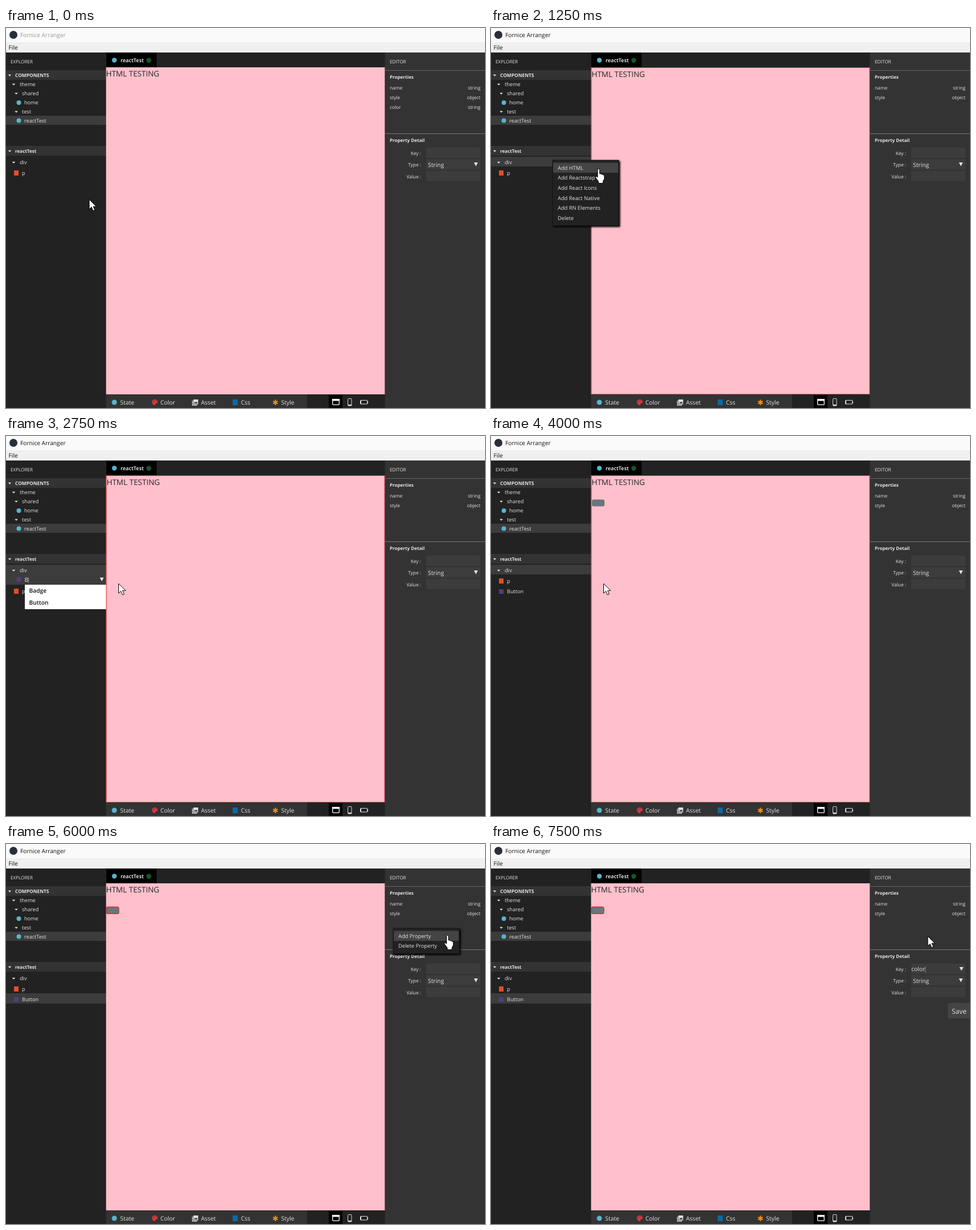
An HTML page for the animation above (8000 ms loop, 840 by 667 pixels).

```html
<!DOCTYPE html>
<html lang="en">
<head>
<meta charset="utf-8">
<style>
  html, body { margin: 0; height: 100%; overflow: hidden; background: #222; }
  svg { display: block; width: 100vw; height: 100vh; font-family: "Open Sans", sans-serif; text-rendering: geometricPrecision; }
  text { white-space: pre; }
</style>
</head>
<body>
<svg id="stage" viewBox="0 0 840 667"></svg>
<script>
const LOOP = 8000;
const REACT = '#53b5cf', HTML = '#e44d26', CSS = '#0b6aa8', PURPLE = '#563d7c';
const ROW = '#3c3c3c', LIGHT = '#e4e4e4';

const rect = (x, y, w, h, fill, more = '') =>
  `<rect x="${x}" y="${y}" width="${w}" height="${h}" fill="${fill}" ${more}/>`;
const dot = (x, y, r, fill) => `<circle cx="${x}" cy="${y}" r="${r}" fill="${fill}"/>`;
const path = (d, fill, more = '') => `<path d="${d}" fill="${fill}" ${more}/>`;
const text = (x, y, size, str, fill = LIGHT, more = '') =>
  `<text x="${x}" y="${y}" font-size="${size}" fill="${fill}" ${more}>${str}</text>`;
const bold = (x, y, size, str, fill = LIGHT) => text(x, y, size, str, fill, 'font-weight="700"');
const right = (x, y, size, str) => text(x, y, size, str, LIGHT, 'text-anchor="end"');
const fold = (x, y) => path(`M${x - 2.8} ${y - 1.3}h5.6l-2.8 3z`, LIGHT);
const arrowDown = (x, y) => path(`M${x - 3.5} ${y - 3}h7l-3.5 6.5z`, LIGHT);
const typed = (x, y, str, caret) =>
  text(x, y, 10.3, str + (caret ? '<tspan dx="-2.2" font-weight="300">|</tspan>' : ''));

function titleBar({ active }) {
  return rect(0, 0, 840, 25, '#fafafa') + rect(0, 25, 840, 18, '#f0f0f0') +
    dot(13, 12, 7, '#2b2e3a') +
    text(25, 16, 10.2, 'Fornice Arranger', active ? '#111' : '#999') +
    text(4.5, 37.5, 10.4, 'File', '#111');
}

function explorer({ selected, hover, input, caret, options, added }) {
  const open = input !== undefined && input !== null;
  const shade = name => hover === name ? '#444' : selected === name ? ROW : 'none';
  let out = rect(0, 43, 176, 624, '#222') +
    text(8, 61.5, 8.1, 'EXPLORER') +
    rect(0, 74, 176, 17, '#333') + fold(6.5, 83) + bold(16, 85.7, 8.4, 'COMPONENTS') +
    rect(0, 154, 176, 16, ROW) +
    fold(13.5, 99) + text(24, 102, 9.15, 'theme') +
    fold(18, 115) + text(28, 118, 9.15, 'shared') +
    dot(22.5, 131, 4, REACT) + text(32, 134, 9.15, 'home') +
    fold(18, 147) + text(28, 149.7, 9.15, 'test') +
    dot(22.5, 162.5, 4, REACT) + text(32, 165.7, 9.15, 'reactTest') +
    rect(0, 207, 176, 17, '#333') + fold(6.5, 216) + bold(16, 219, 8.1, 'reactTest') +
    rect(0, 226, 176, open ? 35 : 17, shade('div')) +
    fold(13.5, 236) + text(24, 239, 9.15, 'div');
  const py = open ? 18 : 0;
  out += rect(14, 250 + py, 8, 9, HTML) + text(28, 257.5 + py, 9.15, 'p');
  if (added) {
    out += rect(0, 262, 176, 18, shade('Button')) +
      rect(14, 269, 8, 8, PURPLE) + text(28, 276, 9.15, 'Button');
  }
  if (open) {
    out += rect(18.5, 248, 8, 8, PURPLE) + typed(32.5, 255.5, input, caret) + arrowDown(168, 251.5);
    if (options.length) out += rect(33, 261, 143, options.length * 21.5, '#fff');
    options.forEach((name, i) =>
      out += text(40.5, 275.3 + i * 21, 10.2, name, '#111', 'font-weight="600"'));
  }
  return out;
}

function preview({ selected, added }) {
  const inset = selected === 'div' ? 1 : 0;
  let out = rect(175.5, 43, 489, 26, '#222') + rect(176, 43, 88, 26, '#000') +
    dot(190, 56.5, 4.2, REACT) + text(201, 60, 9.2, 'reactTest', '#fff', 'font-weight="600"') +
    dot(250.3, 56.7, 4.2, '#125a28') +
    rect(175.5, 69, 489, 574, '#ffc0cb') +
    text(175.5 + inset, 84.7 + inset, 13.45, 'HTML TESTING', '#212529');
  if (inset) out += rect(176, 69.5, 488, 573.5, 'none', 'stroke="#d9303e"');
  if (added) {
    const outline = selected === 'Button' ? 'stroke="#d62a35" stroke-width="1.2"' : '';
    out += rect(176 + inset, 110.4 + inset, 22, 12, '#6c757d', `rx="3" ${outline}`);
  }
  return out;
}

function bottomBar() {
  const petals = [0, 60, 120].map(a =>
    `<path d="M472.5 652.5v9.5" stroke="#f9920f" stroke-width="2" transform="rotate(${a} 472.5 657.2)"/>`).join('');
  return rect(175.5, 643, 353, 24, '#333') + rect(528, 643, 137, 24, '#222') +
    dot(190, 657, 4.5, REACT) + text(200.3, 661, 10.35, 'State') +
    path('M261 652a5 5 0 1 0 0 10c2 0 .5-2 1.5-3s3.500 0 3.500-2.500a5 4.500 0 0 0-5-4.500', '#dc3a40') +
    dot(258.6, 657, .8, '#333') + dot(260, 654.5, .8, '#333') + dot(263, 654.5, .8, '#333') +
    text(270.7, 661, 10.35, 'Color') +
    path('M327 654v8h8', 'none', 'stroke="#ddd" stroke-width="1.3"') +
    rect(328.5, 652, 8.5, 8.5, '#ddd', 'rx="1"') + path('M329.8 659l2-3 1.4 1.600 1.400-2 1.500 3.400z', '#333') +
    text(342, 661, 10.35, 'Asset') +
    rect(397.5, 652, 9, 10, CSS) + text(412, 661, 10.35, 'Css') +
    petals + text(482.5, 661, 10.35, 'Style') +
    rect(566, 644, 24, 23, '#000') +
    rect(572.7, 651.700, 11.600, 9.600, 'none', 'stroke="#fff" stroke-width="1.3" rx="1"') + rect(572, 651, 13, 3.5, '#fff') +
    rect(599.6, 650.500, 6.400, 12.500, 'none', 'stroke="#ddd" rx="1"') + rect(600, 661, 6, 2, '#ddd') +
    rect(621.5, 653.500, 12.500, 6.500, 'none', 'stroke="#ddd" rx="1"') + rect(621, 654, 2, 6, '#ddd') + rect(633, 655.5, 2, 3, '#ddd');
}

function editor({ props, key, caret }) {
  let out = rect(664.5, 43, 176, 624, '#333') + text(673, 61.5, 8.2, 'EDITOR') +
    rect(664.5, 74, 176, 1, '#666') + bold(673, 89, 8.05, 'Properties') +
    rect(664.5, 185, 176, 1, '#777') + bold(673, 200, 8.05, 'Property Detail');
  props.forEach(([name, type], i) =>
    out += text(673, 108 + i * 17, 8.3, name) + right(832, 108 + i * 17, 8.3, type));
  ['Key :', 'Type :', 'Value :'].forEach((label, i) =>
    out += right(728, 223 + i * 20.3, 8.4, label) + rect(737, 210 + i * 20.3, 95, 18, '#3c3c3c'));
  out += text(740, 243.500, 10.3, 'String') + arrowDown(824, 239);
  if (key !== undefined) {
    out += typed(737, 223, key, caret) + arrowDown(825, 219) +
      rect(801, 279, 45, 27, '#444', 'rx="4"') + text(808, 297.500, 12, 'Save');
  }
  return out;
}

function contextMenu({ menu }) {
  if (!menu) return '';
  const { x, y, items, at } = menu, step = 17.65;
  return rect(x - 1, y - 1, 116, items.length * step + 9, '#222',
      'stroke="#151515" style="filter:drop-shadow(2px 2px 1.5px #000)"') +
    (at >= 0 ? rect(x, y + 3.5 + at * step, 114, 17.500, '#444') : '') +
    items.map((item, i) => text(x + 8, y + 15.6 + i * step, 9.3, item)).join('');
}

function pointer({ cursor: [x, y, hand] }) {
  const d = hand
    ? 'M4 2Q4 0 5.700 0T7.500 2V9q2.500-1 3 .8q2.300-.6 2.800 1q2.500-.3 2.500 1.800V18L13.500 22V25.500H5.500V22.500L.5 15.500Q-.3 13.200 2 13.500L4 15z'
    : 'M0 0V17l4-3.700 2.700 6.500 3-1.200-2.700-6.300h5.300z';
  return path(d, '#fff', `stroke="#000" stroke-width="1" transform="translate(${x} ${y})"`);
}

const baseProps = [['name', 'string'], ['style', 'object']];
const nodeMenu = at => ({ x: 109, y: 233, at, items:
  ['Add HTML', 'Add Reactstrap', 'Add React Icons', 'Add React Native', 'Add RN Elements', 'Delete'] });
const propMenu = at => ({ x: 680, y: 149, at, items: ['Add Property', 'Delete Property'] });

// Each step overrides the state built up by the steps before it.
const steps = [
  [0, { cursor: [146, 301], props: [...baseProps, ['color', 'string']] }],
  [250, { cursor: [132, 276] }],
  [500, { cursor: [108, 232], hover: 'div' }],
  [750, { active: true, hover: null, selected: 'div', props: baseProps, menu: nodeMenu(-1) }],
  [1000, { cursor: [146, 239, true], menu: nodeMenu(0) }],
  [1250, { cursor: [183, 247, true] }],
  [1500, { cursor: [192, 259, true], menu: nodeMenu(1) }],
  [1750, { cursor: [197.5, 259], menu: null, input: '', options: [], caret: true }],
  [2000, { caret: false }],
  [2500, { input: 'B', options: ['Badge', 'Button'] }],
  [2750, { caret: true }],
  [3000, { input: 'Bu', options: ['Button'] }],
  [3250, { input: 'Butt' }],
  [3500, { input: 'Button' }],
  [4000, { input: null, added: true }],
  [4500, { cursor: [190, 263] }],
  [4750, { cursor: [178, 266] }],
  [5000, { cursor: [166, 267, true], hover: 'Button' }],
  [5250, { selected: 'Button' }],
  [5500, { cursor: [719, 160], hover: null }],
  [5750, { cursor: [680, 149], menu: propMenu(-1) }],
  [6000, { cursor: [768.5, 160, true], menu: propMenu(0) }],
  [6250, { cursor: [766, 162], menu: null, key: '', caret: true }],
  [6750, { caret: false }],
  [7000, { key: 'c', caret: true }],
  [7250, { key: 'col' }],
  [7500, { key: 'color' }],
];

const layers = [titleBar, explorer, preview, bottomBar, editor, contextMenu, pointer];
const stage = document.getElementById('stage');
let shown = 0;

function frame(now) {
  const time = now % LOOP;
  const past = steps.filter(([start]) => start <= time);
  if (past.length !== shown) {
    shown = past.length;
    const state = Object.assign({}, ...past.map(([, change]) => change));
    stage.innerHTML = layers.map(draw => draw(state)).join('');
  }
  requestAnimationFrame(() => frame(performance.now() - origin));
}
const origin = performance.now();
frame(0);
</script>
</body>
</html>
```
